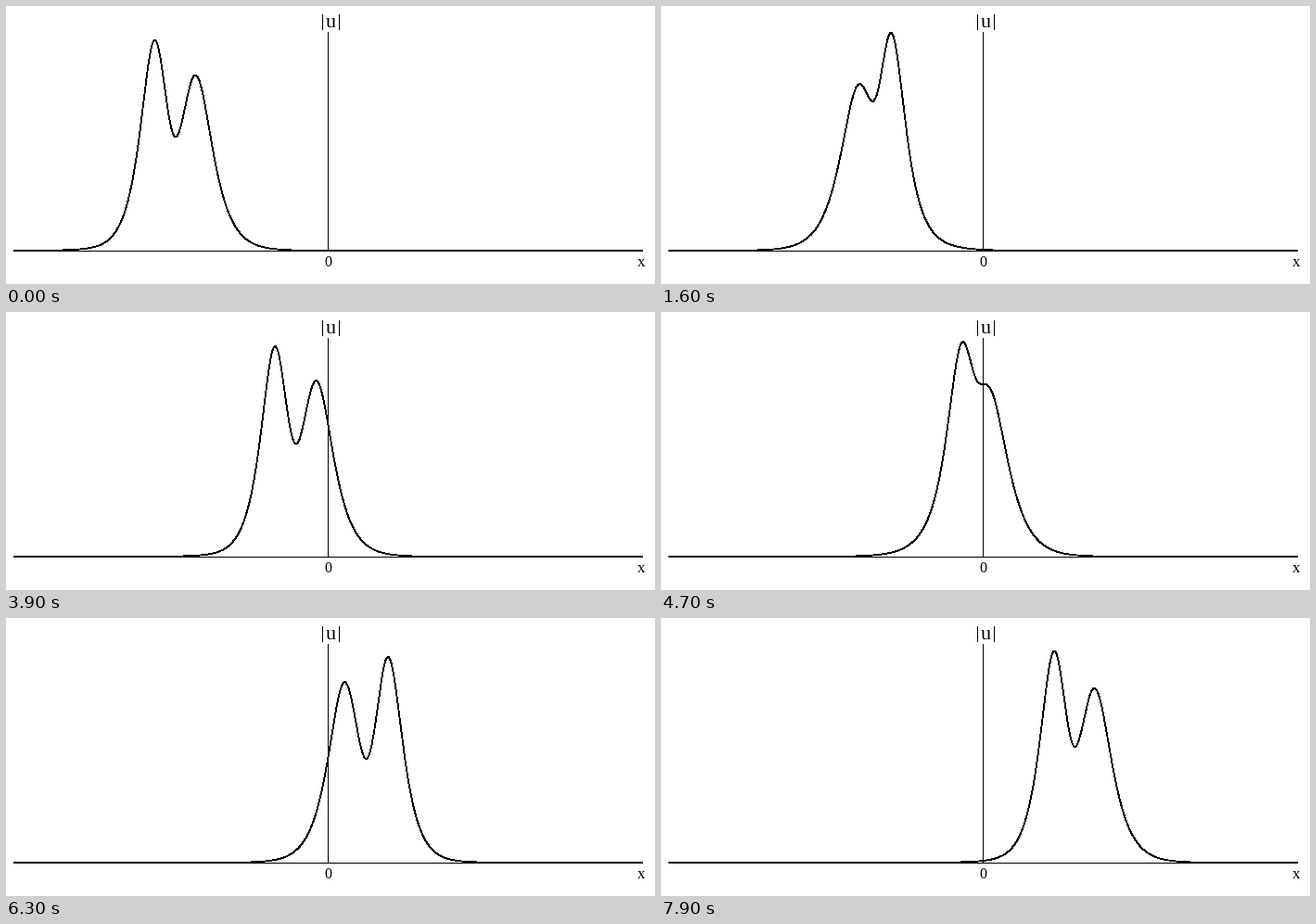
Recreate the animation shown at these times as a matplotlib script. Size 700 px wide and 300 px high, loop 8000 ms.

```python
import numpy as np
import matplotlib.pyplot as plt
from matplotlib.animation import FuncAnimation

W, H, DPI = 700, 300, 100
FRAMES, INTERVAL = 80, 100
PX = 72 / DPI                      # one pixel in points

# Oscillating soliton of the Sasa-Satsuma equation, p = kappa * (1 + i rho)
KAPPA, RHO = 0.06502, 0.165        # decay per pixel, Im p / Re p
MIX = 0.36                         # ratio of the two polarisations
START, SPEED = 180.3, 10 / 3       # centre in pixels, pixels per step
PHASE, RATE = 1.698, 0.16          # phase at the centre, radians per step
HEIGHT, BASE = 1612, 263.9

a = 1 / np.hypot(1, MIX)
b = MIX * a
s = 2 * a * b
q = 1 / (1 + 1j * RHO)
g = 1 - abs(q) ** 2
d = 1 - s ** 2 * abs(q) ** 2
norm = np.sqrt(g * d)

x = np.linspace(8, 687, 1359)


def modulus(n):
    """|u| over x at step n, up to a constant factor."""
    y = KAPPA * (x - START - SPEED * n)
    theta = PHASE - RATE * n + 2 * RHO * y
    w = np.exp(0.5j * theta)
    right = (a * (1 - q) * w + b * np.conj((1 - q) * w)) / np.sqrt(g)
    left = (a * (1 - s * b / a * np.conj(q)) * w
            + b * (1 - s * a / b * q) / w) / np.sqrt(d)
    num = abs(np.exp(y) * right + np.exp(-y) * left)
    cross = 2 - 2 * s * abs(q) ** 2 * np.cos(theta)
    return num / (2 * np.cosh(2 * y) + cross / norm)


fig = plt.figure(figsize=(W / DPI, H / DPI), dpi=DPI, facecolor="white")
ax = fig.add_axes([0, 0, 1, 1])
ax.set_xlim(0, W)
ax.set_ylim(H, 0)
ax.axis("off")


# Without antialiasing every touched pixel is filled, so widths stay below 1.
def stroke(xs, ys):
    return ax.plot(xs, ys, color="black", lw=0.8 * PX, antialiased=False,
                   snap=False, solid_capstyle="butt")[0]


def label(px, py, text, size):
    ax.text(px, py, text, family="Liberation Serif", fontsize=size * PX,
            ha="center", va="baseline", color="black")


stroke([8, 687], [264.5, 264.5])
stroke([347.5, 347.5], [28, 265])
for bar in (341.5, 359.5):
    stroke([bar, bar], [9, 26])
label(350.5, 23, "u", 22)
label(347, 281, "0", 16)
label(685, 281, "x", 17)
curve = stroke(x, np.full_like(x, BASE))


def update(n):
    curve.set_ydata(BASE - HEIGHT * modulus(n))
    return curve,


anim = FuncAnimation(fig, update, frames=FRAMES, interval=INTERVAL,
                     repeat=True, repeat_delay=0)
plt.show()
```
